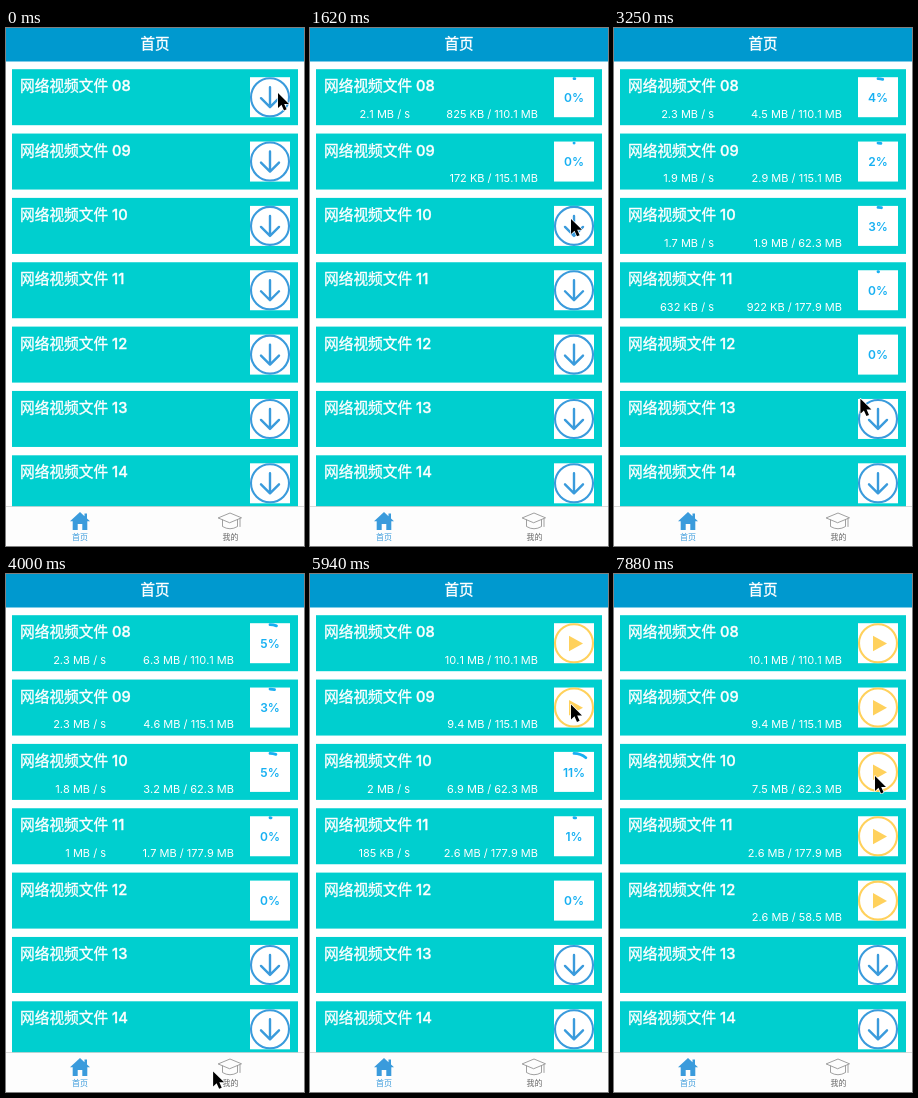
Write an HTML page with a canvas that moves like this. It is 298x518 px and loops after 8 s.

```html
<!DOCTYPE html>
<html lang="zh">
<head>
<meta charset="utf-8">
<style>
  html, body { margin: 0; width: 100%; height: 100%; overflow: hidden; background: #fff; }
  canvas { display: block; width: 298px; height: 518px; }
</style>
</head>
<body>
<canvas id="stage"></canvas>
<script>
const W = 298, H = 518, LOOP = 8000, TICK = 148.5, LAST_TICK = 53;
const BLUE = '#3a9bdc', YELLOW = '#ffd15c', CYAN = '#17b0f2';
const FONT = 'Inter, "Noto Sans CJK SC", "Noto Sans CJK", sans-serif';

const canvas = document.getElementById('stage');
const ctx = canvas.getContext('2d');
const scale = window.devicePixelRatio || 1;
canvas.width = W * scale;
canvas.height = H * scale;

const speedUp = power => u => u ** power;
const slowDown = power => u => 1 - (1 - u) ** power;
const settle = slowDown(2);

// Times in ticks: clicked, first data, first speed reading, paused. Sizes in KB.
const downloads = [
  { clicked: 5, begins: 8.4, measured: 10, paused: 38, total: 110100, end: 10100, curve: speedUp(1.03) },
  { clicked: 8, begins: 9.6, measured: 13, paused: 40, total: 115100, end: 9400, curve: speedUp(1.3) },
  { clicked: 13, begins: 14, measured: 19, paused: 42, total: 62300, end: 7500, curve: speedUp(1.1) },
  { clicked: 15, begins: 17.6, measured: 18, paused: 45, total: 177900, end: 2600, curve: slowDown(2.5) },
  { clicked: 21, begins: 42, measured: 43, paused: 49, total: 58500, end: 2600, curve: speedUp(1.6) }
];
const ROW_COUNT = 7, SPEED_REFRESH = 7;
const rowTop = i => 41.2 + 64.35 * i;

// The pointer reaches each button a tick before the click and leaves on it.
const stop = (tick, x, y) => ({ tick, x, y });
const atButton = (i, tick) => stop(tick, 261, rowTop(i) + 25);
const press = (i, tick) => [atButton(i, tick - 1), atButton(i, tick)];
const pointerPath = [
  stop(0, 272, 65), atButton(0, 2),
  ...downloads.flatMap((d, i) => press(i, d.clicked)),
  stop(12, 280, 188), stop(28, 206, 501), stop(29, 206, 501), stop(35, 237, 276),
  ...downloads.flatMap((d, i) => press(i, d.paused)),
  stop(LAST_TICK, 261, 202)
].sort((a, b) => a.tick - b.tick);

function doneAt(d, k) {
  const u = (k - d.begins) / (d.paused - d.begins);
  return d.end * d.curve(Math.min(1, Math.max(0, u)));
}

function speedAt(d, k) {
  if (k < d.measured || k >= d.paused) return 0;
  const read = k - (k - d.measured) % SPEED_REFRESH;
  return (doneAt(d, read) - doneAt(d, read - 1)) * 1000 / TICK;
}

const size = kb => kb < 1000 ? Math.round(kb) + ' KB' : +(kb / 1000).toFixed(1) + ' MB';

function text(str, x, y, px, weight, color, align = 'left') {
  ctx.font = `${weight} ${px}px ${FONT}`;
  ctx.textAlign = align;
  ctx.fillStyle = color;
  ctx.fillText(str, x, y);
}

// Heading with a hairline outline for a medium weight in Chinese
function heading(str, x, y, px, align) {
  text(str, x, y, px, 500, '#fff', align);
  ctx.strokeStyle = '#fff';
  ctx.lineWidth = 0.35;
  ctx.strokeText(str, x, y);
}

function info(str, right, y) {
  ctx.fontKerning = 'none';
  text(str, right, y, 11, 400, '#fff', 'right');
  ctx.fontKerning = 'auto';
}

function box(x, y, w, h, color) {
  ctx.fillStyle = color;
  ctx.fillRect(x, y, w, h);
}

function fill(path, color) {
  ctx.fillStyle = color;
  ctx.fill(new Path2D(path));
}

function line(path, color, width) {
  ctx.strokeStyle = color;
  ctx.lineWidth = width;
  ctx.stroke(new Path2D(path));
}

function arc(radius, turn, color, width) {
  ctx.beginPath();
  ctx.arc(0, 0, radius, -Math.PI / 2, (turn * 2 - 0.5) * Math.PI);
  ctx.strokeStyle = color;
  ctx.lineWidth = width;
  ctx.stroke();
}

function drawButton(y, state, part) {
  box(244, y + 8, 40, 40, '#fff');
  ctx.save();
  ctx.translate(264, y + 28);
  if (state === 'idle') {
    arc(19, 1, BLUE, 2.1);
    line('M0-10V9.5M-9 1L0 10 9 1', BLUE, 2.4);
  } else if (state === 'paused') {
    arc(19, 1, YELLOW, 2.1);
    fill('M-5-7.5L9 .3-5 8Z', YELLOW);
  } else {
    if (part > 0) arc(18.5, part, CYAN, 2.8);
    text(Math.floor(part * 100) + '%', 0, 4.6, 12, 600, CYAN, 'center');
  }
  ctx.restore();
}

function drawRow(i, k) {
  const y = rowTop(i), d = downloads[i];
  box(6, y, 286, 56, '#00cfcf');
  heading('网络视频文件 ' + String(i + 8).padStart(2, '0'), 14, y + 22, 14.7);
  if (!d || k < d.clicked) return drawButton(y, 'idle');

  const done = doneAt(d, k), speed = speedAt(d, k);
  if (speed) info(size(speed) + ' / s', 100, y + 48.8);
  if (done) info(size(done) + ' / ' + size(d.total), 228, y + 48.8);
  drawButton(y, k < d.paused ? 'loading' : 'paused', done / d.total);
}

function drawTabs() {
  box(0, 478.4, W, 40, '#fdfdfd');
  box(0, 478.4, W, 0.6, '#c4c4c4');
  fill('M74 484L78.5 488.2V485.5H81V490.5L84 493.3H81.3V502H76.3V496H71.7V502H66.7V493.3H64Z', BLUE);
  text('首页', 74, 512.2, 8, 400, BLUE, 'center');
  line('M212.5 489.8L224 485 235.5 489.8 224 494.6ZM216.5 492V498.5Q224 503 231.5 498.5V492M234 491V498.5', '#888', 0.8);
  text('我的', 224.5, 512.2, 8, 400, '#666', 'center');
}

function drawPointer(k) {
  const next = pointerPath.findIndex(p => p.tick > k);
  const to = pointerPath.at(next), from = next < 0 ? to : pointerPath[next - 1];
  const u = to === from ? 0 : settle((k - from.tick) / (to.tick - from.tick));
  const shape = 'M0 0V15L3.5 11.8 6 17.4 8.6 16.3 6.2 10.9H11Z';
  ctx.save();
  ctx.translate(from.x + (to.x - from.x) * u, from.y + (to.y - from.y) * u);
  line(shape, '#fff', 1.4);
  fill(shape, '#000');
  ctx.restore();
}

function draw(now) {
  const k = Math.min(LAST_TICK, Math.floor((now % LOOP + 24) / TICK));
  ctx.setTransform(scale, 0, 0, scale, 0, 0);
  ctx.lineCap = ctx.lineJoin = 'round';
  box(0, 0, W, H, '#fff');
  box(0, 0, W, 33.5, '#0099cf');
  heading('首页', 149, 21.4, 14.5, 'center');
  for (let i = 0; i < ROW_COUNT; i++) drawRow(i, k);
  drawTabs();
  drawPointer(k);
}

const start = performance.now();
function frame() {
  draw(performance.now() - start);
  requestAnimationFrame(frame);
}
frame();
</script>
</body>
</html>
```
